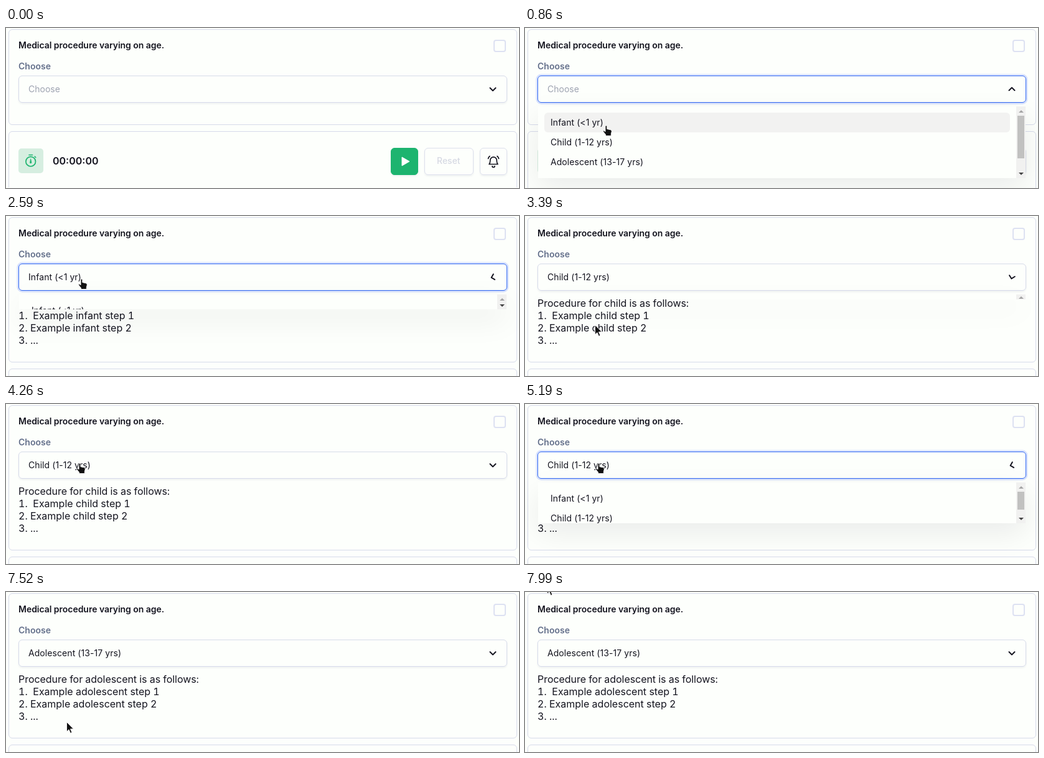
Animation of 824 by 259 pixels, one loop 8060 ms. Source, as an HTML page:

```html
<!DOCTYPE html>
<html lang="en">
<head>
<meta charset="utf-8">
<title>Age dependent procedure</title>
<style>
  html, body { margin: 0; width: 100%; height: 100%; overflow: hidden; background: #fdfffc; }
  #stage { position: relative; width: 824px; height: 259px; overflow: hidden; font: 14px/20px Inter, sans-serif; color: #14141f; }
  #stage div, #stage svg { position: absolute; box-sizing: border-box; }
  .line { white-space: pre; }
  .card { left: 4px; width: 817px; border: 1px solid #d6daea; border-radius: 6px; }
  #top { top: 2px; }
  #bottom { height: 140px; }
  #title { left: 20px; top: 18px; font-weight: 600; letter-spacing: -.03px; }
  #label { left: 20px; top: 52px; font-weight: 600; color: #64708b; }
  #check { left: 783px; top: 19px; width: 20px; height: 20px; border: 2px solid #dde1f2; border-radius: 4px; }
  #select { left: 20px; top: 77px; width: 785px; height: 44px; border: 1px solid #d6daea; border-radius: 6px; box-shadow: 0 2px 3px rgba(20, 30, 60, .06); }
  .open #select { border-color: #2f66f3; box-shadow: 0 0 0 2.5px #d8e2fd; }
  #value { left: 36px; top: 89px; }
  #value, .option { letter-spacing: .07px; }
  .empty #value { color: #9ea3b1; letter-spacing: 0; }
  #chevron { left: 774px; top: 91px; }
  #steps { left: 20px; top: 131px; font-size: 16px; font-variant-numeric: tabular-nums; }
  #steps::first-line { letter-spacing: -.05px; }
  .empty #steps { display: none; }
  #menu { left: 21px; top: 127px; width: 783px; overflow: hidden; background: #fdfffc; }
  #shade { left: 21px; top: 127px; width: 783px; border-radius: 6px; box-shadow: 0 16px 48px rgba(10, 15, 20, .08); }
  .option { left: 10px; width: 748px; height: 32px; padding: 6px 10px; border-radius: 6px; }
  .option.hover { background: #f2f2f1; }
  #bar { right: 0; top: 0; width: 15px; height: 100%; background: #f1f1f0; }
  #thumb { left: 2px; top: 15px; width: 11px; background: #c1c1c0; }
  #up, #down { left: 4px; border: 4px solid transparent; border-top-width: 0; border-bottom: 4px solid #a3a3a3; }
  #down { border-width: 4px 4px 0; border-top-color: #444; }
  .button { top: 26px; height: 44px; border: 1px solid #dcdfec; border-radius: 6px; box-shadow: 0 2px 3px rgba(20, 30, 60, .06); }
  #bottom .line { top: 37px; }
  #cut { left: 0; top: 258px; width: 824px; height: 1px; background: #fdfffc; }
  #cursor { left: 0; top: 0; overflow: visible; }
</style>
</head>
<body>
<div id="stage">
  <div id="top" class="card"></div>
  <div id="title" class="line">Medical procedure varying on age.</div>
  <div id="check"></div>
  <div id="label" class="line">Choose</div>
  <div id="steps" class="line"></div>
  <div id="bottom" class="card">
    <div style="left:15px;top:27px;width:40px;height:40px;border-radius:5px;background:#d6eee0"></div>
    <svg style="left:23px;top:35px" width="24" height="24" fill="none" stroke="#1db46f" stroke-width="1.7" stroke-linecap="round">
      <circle cx="11.7" cy="13.2" r="7.8"/>
      <path d="M9 2.5h5.5M18.2 5l1.5 1.5"/>
      <path d="M11.7 9.2l1.1 5a1.2 1.2 0 1 1-2.2 0z" fill="#1db46f" stroke-width=".8"/>
    </svg>
    <div class="line" style="left:70px;font-size:16px;font-weight:600">00:00:00</div>
    <div class="button" style="left:613px;width:44px;background:#1db46f;border-color:#1db46f"></div>
    <svg style="left:630px;top:40px" width="14" height="16"><path d="M1 1v14L13 8z" fill="#fff" stroke="#fff" stroke-linejoin="round"/></svg>
    <div class="button" style="left:667px;width:79px"></div>
    <div class="line" style="left:687px;color:#d6d9e3;font-weight:500">Reset</div>
    <div class="button" style="left:756px;width:44px"></div>
    <svg style="left:768px;top:37px" width="20" height="22" fill="none" stroke="#14141f" stroke-width="1.7" stroke-linecap="round" stroke-linejoin="round">
      <path d="M3 15.5c2-2 1.5-4 1.8-6.5a5.2 5.2 0 0 1 10.4 0c.3 2.5-.2 4.5 1.8 6.5zM8 18.5a2 2 0 0 0 4 0M1.5 6.5q.5-2.500 2.5-4M18.5 6.5q-.5-2.500-2.5-4"/>
    </svg>
  </div>
  <div id="select"></div>
  <div id="shade"></div>
  <div id="value" class="line"></div>
  <svg id="chevron" width="16" height="16"><path d="M3.5 6L8 10.5 12.5 6" fill="none" stroke="#14141f" stroke-width="2" stroke-linecap="round" stroke-linejoin="round"/></svg>
  <div id="menu">
    <div id="bar"><div id="up"></div><div id="thumb"></div><div id="down"></div></div>
  </div>
  <div id="cut"></div>
  <svg id="cursor" width="16" height="20" fill="#111" stroke="#fff" stroke-width=".9" stroke-linejoin="round">
    <path id="arrow" d="M.5 .5V16L4 12.7 6.5 18.5 9 17.4 6.5 11.8H11.5z"/>
    <path id="hand" d="M-2 1.3Q-2 0-.7 0T.8 1.3V5.5L6.3 6.7Q8.5 7.2 8.3 9.5L7.3 13.5V16.5H-1.5V14.5L-5.2 10Q-6 8-4.3 8L-2 9.8z"/>
  </svg>
</div>
<script>
const LOOP = 8060, TICK = 1000 / 15, LAST = 120;
const MENU_TOP = 127, FULL = 116, ROW = 32, PAD = 10;
const OPEN_TICKS = 1.7, TURN = 75;
const $ = id => document.getElementById(id);
const clamp = v => Math.min(1, Math.max(0, v));
const smooth = v => v * v * (3 - 2 * v);

const options = ["Infant (<1 yr)", "Child (1-12 yrs)", "Adolescent (13-17 yrs)", "Adult (18+ yrs)"];

// Each visit opens the menu and closes it by picking the next option.
const visits = [
  { open: 6.6, close: 16.4 },
  { open: 38.65, close: 50.07 },
  { open: 77.03, close: 91.18 }
];

const home = { x: 122, y: 108 };
const moves = [
  { from: 7, to: 13, x: 131, y: 158 },
  { from: 22, to: 30, x: 122, y: 102 },
  { from: 41, to: 48, x: 112, y: 176 },
  { from: 55, to: 64, x: 119, y: 96 },
  { from: 80, to: 87, x: 100, y: 220 },
  { from: 112, to: 120, x: 35, y: -13 }
];

function pointerAt(tick) {
  return moves.reduce((p, m) => {
    const k = smooth(clamp((tick - m.from) / (m.to - m.from)));
    return { x: p.x + (m.x - p.x) * k, y: p.y + (m.y - p.y) * k };
  }, home);
}

function menuAt(tick) {
  const picked = visits.filter(v => v.close < tick).length;
  const visit = visits.findLast(v => v.open < tick);
  if (!visit) return { picked, height: 0, angle: 0, open: false };
  if (tick < visit.close) {
    const age = tick - visit.open;
    return { picked, height: FULL * clamp(age / OPEN_TICKS), angle: Math.min(180, TURN * Math.ceil(age)), open: true };
  }
  const left = clamp(1 - (tick - visit.close));
  return { picked, height: FULL * left, angle: 180 * left, open: false };
}

const rows = options.map((text, i) => {
  const row = document.createElement("div");
  row.className = "option line";
  row.style.top = PAD + ROW * i + "px";
  row.textContent = text;
  $("menu").append(row);
  return row;
});

function stepsFor(option) {
  const kind = option.split(" ")[0].toLowerCase();
  return `Procedure for ${kind} is as follows:\n1.\u00a0 Example ${kind} step 1\n2. Example ${kind} step 2\n3. ...`;
}

function drawMenu({ height, angle, open }, y) {
  $("stage").classList.toggle("open", open);
  $("chevron").style.transform = `rotate(${angle}deg)`;
  $("menu").style.height = $("shade").style.height = height + "px";
  $("shade").style.display = height ? "" : "none";
  $("up").style.top = Math.min(6, height / 4 + 1) + "px";
  $("down").style.top = height - Math.min(9, height / 3) + "px";
  $("down").style.display = height < 15 ? "none" : "";
  $("thumb").style.height = Math.max(0, (height - 30) * .8) + "px";
  const over = open ? Math.floor((y - MENU_TOP - PAD) / ROW) : -1;
  rows.forEach((row, i) => row.classList.toggle("hover", i === over));
}

function drawPage(picked) {
  const empty = !picked, option = options[picked - 1];
  $("stage").classList.toggle("empty", empty);
  $("top").style.height = (empty ? 155 : 235) + "px";
  $("bottom").style.top = (empty ? 167 : 247) + "px";
  $("value").textContent = empty ? "Choose" : option;
  $("steps").textContent = empty ? "" : stepsFor(option);
}

function drawPointer({ x, y }, open) {
  const hand = open || y > 77 && y < 121;
  $("cursor").style.transform = `translate(${Math.round(x)}px, ${Math.round(y)}px)`;
  $("hand").style.display = hand ? "" : "none";
  $("arrow").style.display = hand ? "none" : "";
}

function draw(tick) {
  const menu = menuAt(tick), pointer = pointerAt(tick);
  drawPage(menu.picked);
  drawMenu(menu, pointer.y);
  drawPointer(pointer, menu.open);
  $("cursor").style.display = tick ? "" : "none";
  $("cut").style.display = tick ? "none" : "";
}

const start = performance.now();
function loop() {
  const t = (performance.now() - start) % LOOP;
  draw(Math.min(LAST, Math.floor((t + 13.4) / TICK)));
  requestAnimationFrame(loop);
}
loop();
</script>
</body>
</html>
```
